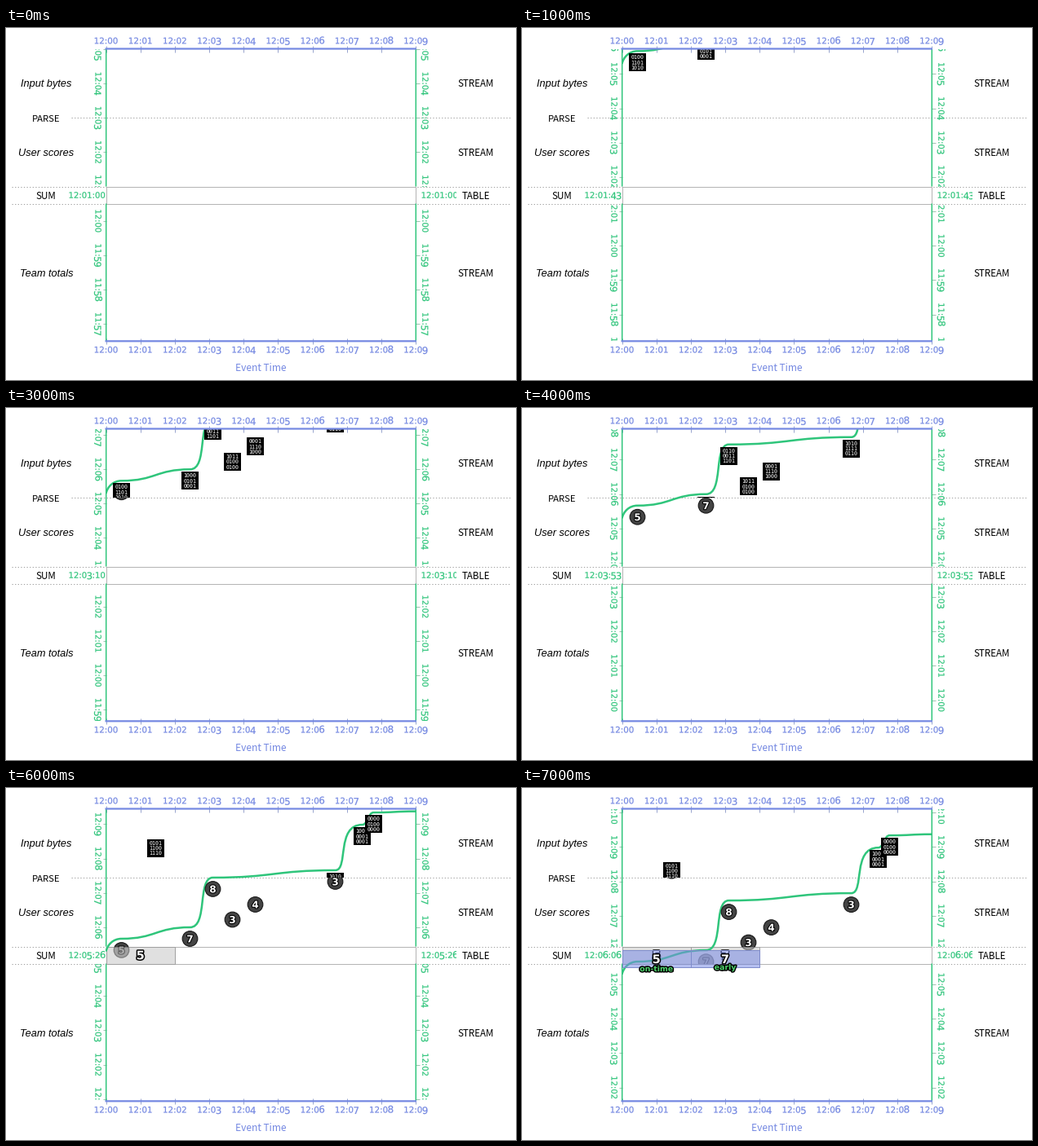
A matplotlib script for the animation above (8 s loop, 625 px wide and 432 px high).

```python
import math
from functools import lru_cache

import matplotlib.pyplot as plt
import numpy as np
from matplotlib.animation import FuncAnimation
from matplotlib.patches import Circle, PathPatch, Rectangle
from matplotlib.path import Path
from matplotlib.patheffects import withStroke
from matplotlib.textpath import TextPath
from matplotlib.transforms import Affine2D, Bbox, TransformedBbox

W, H, DPI = 625, 432, 100
PX = 72 / DPI
LEFT, RIGHT, TOP, BOTTOM = 122.5, 502, 26, 384
MINUTE = (RIGHT - LEFT) / 9
PARSE_Y, SUM_TOP, SUM_BOTTOM = 110, 194.6, 215.5
GREEN, BLUE, GREY = "#2fc57b", "#7488e2", "#a0a0a0"
SANS = "Noto Sans CJK JP"

# x, processing minute, value, raw bytes
EVENTS = [
    (141.5, 5.333, "5", "0100 1101 1010"),
    (225.5, 5.665, "7", "1000 0101 0001"),
    (277.5, 6.222, "3", "1011 0100 0100"),
    (305.5, 6.661, "4", "0001 1110 1000"),
    (253.5, 7.112, "8", "0110 0011 1101"),
    (403.5, 7.325, "3", "1010 1111 0110"),
    (183.5, 8.306, "9", "0101 1100 1110"),
    (436.5, 8.650, "8", "1000 0001 0001"),
    (450.5, 9.006, "1", "0000 0100 0000"),
]
# first minute, arrival minute, total, pane label, label offset
WINDOWS = [
    (0, 5.333, "5", "on-time", 12.2),
    (2, 5.665, "7", "early", 10.3),
]
PANE_START = 6.0

fig = plt.figure(figsize=(W / DPI, H / DPI), dpi=DPI, facecolor="white")
ax = fig.add_axes([0, 0, 1, 1])


def clip_box(x0, y0, x1, y1):
    box = Bbox([[x0 / W, 1 - y1 / H], [x1 / W, 1 - y0 / H]])
    return TransformedBbox(box, fig.transFigure)


STAGE = clip_box(0, 0, W, H)
PLOT = clip_box(LEFT - 1, TOP, RIGHT, BOTTOM)
RAW = clip_box(LEFT, TOP, RIGHT, PARSE_Y)
SCORES = clip_box(LEFT, PARSE_Y, RIGHT, SUM_TOP)
TABLE = clip_box(LEFT, SUM_TOP, RIGHT, SUM_BOTTOM)
UPPER_AXIS = clip_box(0, TOP, W, SUM_TOP)
LOWER_AXIS = clip_box(0, SUM_BOTTOM + 0.5, W, BOTTOM)


def add(patch, box=STAGE):
    ax.add_patch(patch)
    patch.set_clip_box(box)


def line(xs, ys, color, width, z=2, box=STAGE, **kw):
    item, = ax.plot(xs, ys, color=color, lw=width * PX, zorder=z,
                    solid_capstyle="butt", **kw)
    item.set_clip_box(box)


def label(x, y, text, size, color="black", font=SANS, z=5, box=STAGE,
          outline=0, **kw):
    """Text centred on x, with its capitals centred on y."""
    item = ax.text(x, y + 0.365 * size, text, fontsize=size * PX, color=color,
                   family=font, ha="center", va="baseline", zorder=z,
                   clip_on=True, **kw)
    item.set_clip_box(box)
    if outline:
        item.set_path_effects(
            [withStroke(linewidth=outline * PX, foreground="black")])


@lru_cache(None)
def numerals(text, size):
    """Outline and width of a time set in old-style tabular figures."""
    x, glyphs = 0, []
    for ch in text:
        scale = 1.15 if ch in "3456789" else 1
        drop = 0.14 * size if ch in "34579" else 0
        advance = (0.337 if ch == ":" else 0.636) * size
        inset = advance * (1 - scale) / 2
        glyphs.append(TextPath((x + inset, -drop), ch, size=size * scale))
        x += advance
    return Path.make_compound_path(*glyphs), x


def time_text(x, y, text, color, box=STAGE, size=10.3, align="center",
              vertical=False):
    path, width = numerals(text, size)
    start = -width / 2 if align == "center" else 0
    if vertical:
        place = Affine2D(np.array([[0, 1, x], [1, 0, y + start], [0, 0, 1]]))
    else:
        place = Affine2D(np.array([[1, 0, x + start], [0, -1, y], [0, 0, 1]]))
    add(PathPatch(place.transform_path(path), fc=color, ec=color,
                  lw=0.2 * PX, zorder=3), box)


def clock_at(ms):
    """Processing time in seconds after 12:00."""
    return np.interp(ms / 1000, [0, 4, 5, 6, 7], [60, 233.4, 279.6, 326.2, 366.2])


def hhmm(minute):
    return f"{12 + minute // 60}:{minute % 60:02d}"


def draw_stage():
    for y, x0 in ((PARSE_Y, 80), (SUM_TOP, 7), (SUM_BOTTOM, 7)):
        line([x0, 618], [y, y], GREY, 1, 1, linestyle=(0, (1.3, 2.3)))
    add(Rectangle((LEFT, SUM_TOP), RIGHT - LEFT, SUM_BOTTOM - SUM_TOP,
                  fc="none", ec="#b4b4b4", lw=PX, zorder=2))
    for y, base in ((25.5, 19.3), (384.3, 398.5)):
        for m in range(10):
            x = LEFT + m * MINUTE
            line([x, x], [y - 3.5, y + 4], "#9aa6cf", 1)
            time_text(x, base, hhmm(m), BLUE)
        line([LEFT - 1, RIGHT + 1], [y, y], BLUE, 2.2, 9, snap=False)
    for x in (LEFT + 0.2, RIGHT + 0.3):
        for span in ((TOP, SUM_TOP), (SUM_BOTTOM, BOTTOM)):
            line([x, x], span, GREEN, 1.5, 3, snap=False)
    for y, text in ((67.5, "Input bytes"), (152.5, "User scores"),
                    (300.5, "Team totals")):
        label(49.3, y, text, 12.7, font="Liberation Sans", style="italic")
        label(576, y + 0.5, "STREAM", 11.6)
    label(49.3, PARSE_Y + 0.5, "PARSE", 11.4)
    label(49, 205.3, "SUM", 11.6)
    label(575.7, 205.3, "TABLE", 11.6)
    label(312.5, 417, "Event Time", 12, BLUE)


def draw_clock(seconds, y_of):
    s = int(seconds)
    text = f"{hhmm(s // 60)}:{s % 60:02d}"
    right_slot = clip_box(500, 190, 551.5, 220)
    time_text(76.5, 208.7, text, GREEN, size=10.1, align="left")
    time_text(508.6, 208.7, text, GREEN, right_slot, 10.1, "left")
    now = math.floor(seconds / 60)
    for m in range(now - 5, now + 6):
        y = y_of(m)
        for box in (UPPER_AXIS, LOWER_AXIS):
            for x, tick in ((109.5, LEFT - 4), (510.3, RIGHT)):
                time_text(x, y, hhmm(m), GREEN, box, 10, vertical=True)
                line([tick, tick + 4.5], [y, y], "#9fc4b1", 1, 2, box)


def draw_watermark(y_of):
    lift = 14 / MINUTE
    steps = [EVENTS[i][:2] for i in (0, 1, 4, 5, 7, 8)] + [(RIGHT, 9.04)]
    pulls = [(0.5, 0.5), (0.8, 0.3), (0.5, 0.5), (0.5, 0.02), (0.5, 0.5), (0.5, 0.5)]
    x, t = steps[0]
    y = y_of(t + lift)
    pts = [(LEFT, y_of(5.295)), (LEFT + 2, y + 7), (LEFT + 9, y), (x, y)]
    for (x1, t1), (a, b) in zip(steps[1:], pulls):
        y1 = y_of(t1 + lift)
        pts += [(x + a * (x1 - x), y), (x + b * (x1 - x), y1), (x1, y1)]
        x, y = x1, y1
    codes = [Path.MOVETO] + [Path.CURVE4] * (len(pts) - 1)
    add(PathPatch(Path(pts, codes), fc="none", ec=GREEN, lw=2.5 * PX,
                  zorder=4.5), PLOT)


def draw_score(x, y, value, z, box, alpha=1):
    add(Circle((x, y), 9.3, fc="#444444", ec="#1c1c1c", lw=1.2 * PX,
               alpha=alpha, zorder=z), box)
    label(x, y, value, 12, "white", "DejaVu Sans", z, box, 2.2,
          weight="bold", alpha=alpha)


def draw_event(i, event, y_of):
    x, t, value, raw = event
    y, z = y_of(t), 5 + i / 50
    if y - 11 < PARSE_Y and y + 11 > TOP:
        add(Rectangle((x - 10.8, y - 11), 21.6, 22, fc="black", lw=0, zorder=z), RAW)
        for k, bits in enumerate(raw.split()):
            label(x, y + 6.3 * (k - 1), bits, 6.6, "white",
                  "DejaVu Sans Mono", z, RAW)
    if y + 10 > PARSE_Y and y - 10 < SUM_TOP:
        draw_score(x, y, value, z, SCORES)
    if y + 10 > SUM_TOP and y - 10 < SUM_BOTTOM:
        draw_score(x, y, value, z, TABLE, 0.4)


def draw_windows(now, y_of):
    height = SUM_BOTTOM - SUM_TOP
    top = y_of(PANE_START)
    for first, arrival, total, name, offset in WINDOWS:
        if now < arrival:
            continue
        x, mid = LEFT + first * MINUTE, LEFT + (first + 1) * MINUTE
        add(Rectangle((x, SUM_TOP), 2 * MINUTE, height, fc="#e0e0e0",
                      ec="#a0a0a0", lw=PX, zorder=4))
        label(mid, 205, total, 14.5, "white", "DejaVu Sans", 6, outline=3,
              weight="bold")
        if now < PANE_START:
            continue
        add(Rectangle((x, top), 2 * MINUTE, height, fc="#7b8de6", lw=0,
                      alpha=0.55, zorder=7))
        add(Rectangle((x, top), 2 * MINUTE, height, fc="none", ec="#7f8ccb",
                      lw=PX, zorder=7))
        center = top + height / 2
        label(mid, center + 0.3, total, 14.5, "white", "DejaVu Sans", 8,
              outline=3, weight="bold")
        label(mid, center + offset, name, 9.4, "#4fd36c", "DejaVu Sans", 8,
              outline=3, weight="bold")


def update(i):
    ax.clear()
    ax.set(xlim=(0, W), ylim=(H, 0))
    ax.axis("off")
    seconds = clock_at(i * 1000)
    now = seconds / 60

    def y_of(minute):
        return SUM_TOP - (minute - now) * MINUTE

    draw_stage()
    draw_clock(seconds, y_of)
    draw_watermark(y_of)
    for k, event in enumerate(EVENTS):
        draw_event(k, event, y_of)
    draw_windows(now, y_of)
    return []


anim = FuncAnimation(fig, update, frames=8, interval=1000, repeat=True,
                     repeat_delay=0)
plt.show()
```
